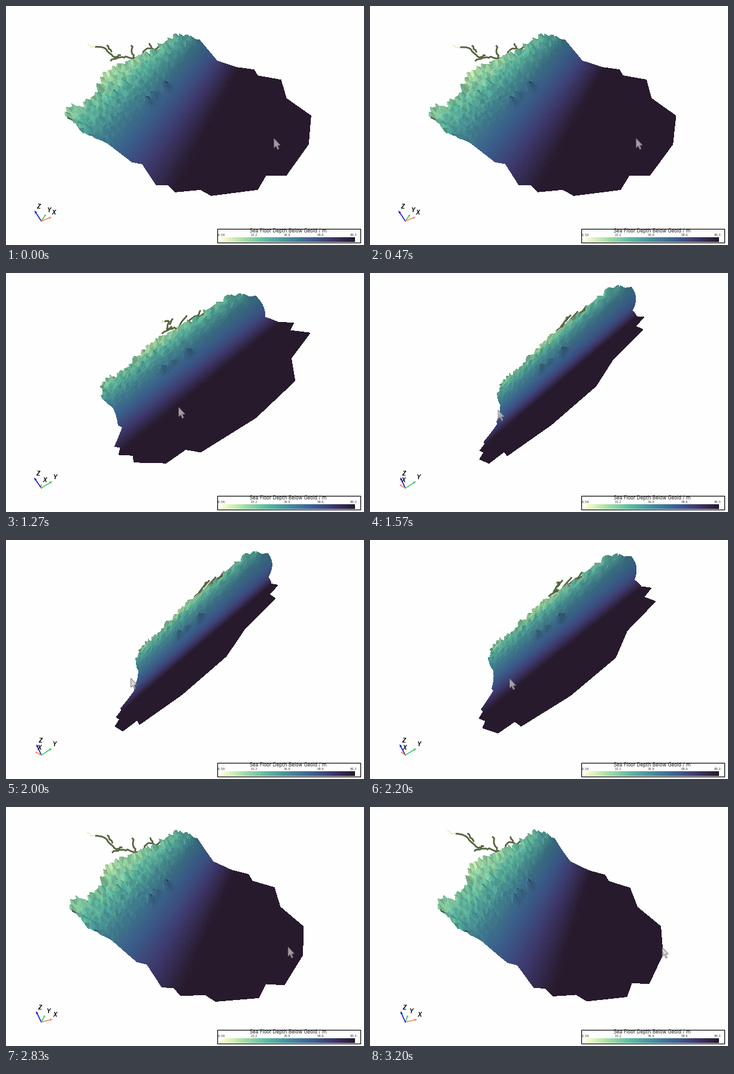
Animation, 598 px wide and 400 px high, one loop 3.23 s. Source, as a matplotlib script:

```python
import numpy as np
import matplotlib.pyplot as plt
from matplotlib.animation import FuncAnimation
from matplotlib.collections import LineCollection, PolyCollection
from matplotlib.colors import LinearSegmentedColormap
from matplotlib.patches import Polygon, Rectangle
from matplotlib.path import Path
from matplotlib.tri import Triangulation

W, H, LOOP, FRAMES = 598, 400, 3230, 95
STEP = LOOP // FRAMES
FOCAL = 746                       # 30 degree view angle, in pixels
PX = 0.72                         # points per pixel at 100 dpi
PAPER = "#fefefe"
rng = np.random.default_rng(4)

SEA = LinearSegmentedColormap.from_list("sea", [
    "#fdfecc", "#a5dea7", "#5eb9a3", "#488d9d", "#3e6394", "#3e396d",
    "#271a2c"])

# Key corners of the survey area in the opening view, the rest is roughened
COAST = np.array([
    (151, 222), (127, 208), (101, 186), (109, 170), (126, 172), (157, 145),
    (162, 118), (196, 99), (248, 77), (286, 50), (323, 57)], float)
OFFSHORE = np.array([
    (352, 92), (385, 103), (414, 107), (420, 117), (459, 124), (468, 155),
    (509, 184), (505, 231), (468, 283), (434, 283), (420, 307), (343, 317),
    (325, 307), (283, 311), (271, 299), (251, 299), (228, 264), (211, 261),
    (168, 228)], float)
SEAMOUNTS = [(268, 137, 15), (248, 151, 9), (239, 162, 12)]
RIVER = [((217, 94), (149, 69)), ((211, 87), (260, 64)), ((212, 86), (209, 65)),
         ((176, 77), (169, 65)), ((244, 71), (239, 62)), ((192, 82), (175, 92))]


def view_axes(azimuth, elevation, roll):
    """World X, Y, Z as rows of right, up, towards-viewer components."""
    a, e, r = np.radians([azimuth, elevation, roll])
    right = np.array([-np.sin(a), np.cos(a), 0])
    up = np.array([-np.sin(e) * np.cos(a), -np.sin(e) * np.sin(a), np.cos(e)])
    return np.column_stack([np.cos(r) * right - np.sin(r) * up,
                            np.sin(r) * right + np.cos(r) * up,
                            np.cross(right, up)])


AXES = view_axes(-55.5, 16.7, 33)


def shelf(p):
    """Signed distance from the shelf break and plane term of the depth."""
    x, y = p[:, 0] - W / 2, p[:, 1] - H / 2
    plane = 1.0165 - .000114 * x + .0015 * y
    return (.81 * (x - 46) + .585 * (y + 100)) / plane ** 2, plane


def lift(p):
    """Place opening-view pixels on the sea floor in camera space."""
    e, plane = shelf(p)
    near = 1 / (plane + .042 * (1 + np.tanh((-e - 62) / 55)))
    return np.column_stack([(p[:, 0] - W / 2) * near,
                            (H / 2 - p[:, 1]) * near, FOCAL * (1 - near)])


def project(q):
    s = FOCAL / (FOCAL - q[:, 2])
    return np.column_stack([W / 2 + q[:, 0] * s, H / 2 - q[:, 1] * s])


def densify(p, gap):
    out = []
    for a, b in zip(p[:-1], p[1:]):
        n = max(1, int(np.hypot(*(b - a)) / gap))
        out.append(a + (b - a) * np.arange(n)[:, None] / n)
    return np.vstack(out + [p[-1:]])


def lattice(gap):
    g = np.mgrid[95:515:gap, 45:320:gap].reshape(2, -1).T
    return g + rng.uniform(-.2, .2, g.shape) * gap


def build_floor():
    coast = densify(COAST, 3)
    coast[1:-1] += rng.normal(0, .9, (len(coast) - 2, 2))
    rest = densify(np.vstack([COAST[-1:], OFFSHORE, COAST[:1]]), 6)[1:-1]
    rim = np.vstack([coast, rest])
    shape = Path(rim)
    fine, wide = lattice(5), lattice(10)
    inner = np.vstack([fine[shelf(fine)[0] < 50], wide[shelf(wide)[0] >= 50]])
    inner = inner[shape.contains_points(inner)]
    gap = np.hypot(*(inner[:, None] - rim[None]).transpose(2, 0, 1)).min(1)
    pts = np.vstack([rim, inner[gap > 3]])

    tri = Triangulation(pts[:, 0], pts[:, 1]).triangles
    tri = tri[shape.contains_points(pts[tri].mean(1))]

    # Ridges run seaward, the shoreline itself is spiky
    e, _ = shelf(pts)
    along = .81 * pts[:, 1] - .585 * pts[:, 0]
    rough = np.clip((-e - 45) / 70, 0, 1)
    height = 1.8 * np.sin(.5 * along + 2 * np.sin(.05 * e))
    height += rng.normal(0, 1.3, len(pts))
    height[:len(coast)] += np.abs(rng.normal(1, 3.5, len(coast)))
    height *= rough
    for x, y, h in SEAMOUNTS:
        height += h * np.exp(-((pts - (x, y)) ** 2).sum(1) / 30)
    xyz = lift(pts) + height[:, None] * AXES[2]

    v = np.clip(.79 + .004 * e, .1, 1)
    v += .05 * rough * np.sin(pts[:, 0] * .21) * np.sin(pts[:, 1] * .17 + 1)

    a, b, c = xyz[tri].transpose(1, 0, 2)
    normal = np.cross(b - a, c - a)
    normal *= np.sign(normal[:, 2:])
    normal /= np.linalg.norm(normal, axis=1)[:, None]
    light = np.clip(.5 + .55 * normal @ [-.35, .5, .79], .5, 1.05)
    slope = np.clip((35 - e[tri].mean(1)) / 60, 0, 1)
    rgb = SEA(v[tri].mean(1))[:, :3] * (1 + slope * (light - 1))[:, None]
    return xyz, tri, np.clip(rgb, 0, 1)


def meander(a, b):
    """A winding creek between two points on the land."""
    p = densify(np.array([a, b], float), 3)
    u = np.linspace(0, 1, len(p))
    reach = np.subtract(b, a)
    side = np.array([-reach[1], reach[0]]) / np.hypot(*reach)
    sway = .06 * np.hypot(*reach) * np.sin(3 * np.pi * u)
    return lift(p + sway[:, None] * side + rng.normal(0, .7, p.shape))


def cursor_path(t):
    """Smooth pointer track through its main stops."""
    key = np.array([
        (0, 448, 222), (500, 443, 222), (870, 414, 224), (1270, 290, 225),
        (1640, 206, 230), (2000, 209, 231.5), (2140, 216, 232),
        (2430, 369, 234.5), (2830, 470, 234.5), (3230, 489, 235)])
    kt, kp = key[:, 0], key[:, 1:]
    m = np.gradient(kp, kt, axis=0)
    i = np.clip(np.searchsorted(kt, t, "right") - 1, 0, len(kt) - 2)
    h = (kt[i + 1] - kt[i])[:, None]
    u = (t - kt[i])[:, None] / h
    return ((1 + 2 * u) * (1 - u) ** 2 * kp[i] + u * (1 - u) ** 2 * h * m[i]
            + u * u * (3 - 2 * u) * kp[i + 1] + u * u * (u - 1) * h * m[i + 1])


def trackball(track):
    """Accumulate the drag into one rotation per frame."""
    rot, poses = np.eye(3), [np.eye(3)]
    for dx, dy in np.diff(track, axis=0):
        az, el = np.radians([-208 * dx / W, 200 * dy / H])
        ca, sa, ce, se = np.cos(az), np.sin(az), np.cos(el), np.sin(el)
        turn = np.array([[ca, 0, -sa], [0, 1, 0], [sa, 0, ca]])
        tilt = np.array([[1, 0, 0], [0, ce, -se], [0, se, ce]])
        rot = tilt @ turn @ rot
        poses.append(rot)
    return poses


xyz, tri, rgb = build_floor()
river = [meander(a, b) for a, b in RIVER]
creek = meander((150, 70), (136, 66))
track = cursor_path((np.arange(FRAMES) + .5) * STEP)
poses = trackball(track)

fig = plt.figure(figsize=(W / 100, H / 100), dpi=100, facecolor=PAPER)
ax = fig.add_axes([0, 0, 1, 1])
ax.axis("off")

creek_art = ax.plot([], [], color="#dfe0a0", lw=1 * PX, zorder=1)[0]
river_art = LineCollection([], colors="#55643f", linewidths=2.8 * PX, zorder=1)
floor_art = PolyCollection([], linewidths=.5 * PX, antialiased=False, zorder=2)
ax.add_collection(river_art)
ax.add_collection(floor_art)

# Scalar bar
ax.add_patch(Rectangle((353, 373), 239, 23, fc=PAPER, ec="black", lw=1.2 * PX,
                       zorder=5))
ax.imshow(np.linspace(0, 1, 256)[None], cmap=SEA, aspect="auto",
          extent=(360, 583, 395, 387), zorder=6)
ax.set(xlim=(0, W), ylim=(H, 0))
ax.text(471.5, 379, "Sea Floor Depth Below Geoid / m", ha="center",
        va="baseline", size=7.74 * PX, color="#222222", family="DejaVu Sans",
        zorder=7)
for i in range(5):
    ax.text(359.5 + 55.2 * i, 384.8, f"{-6.56 + 21.715 * i:.3g}", ha="center",
            va="baseline", size=5.2 * PX, color="#444444",
            family="DejaVu Sans", zorder=7)

# Orientation axes
ORIGIN = np.array([59, 360])
triad = []
for name, color in zip("XYZ", ["#ff8250", "#3cc86e", "#1414d2"]):
    stem = ax.plot([], [], color=color, lw=1.6 * PX, zorder=8)[0]
    head = ax.add_patch(Polygon([(0, 0)] * 3, fc=color, lw=0, zorder=8))
    text = ax.text(0, 0, name, ha="center", va="center", size=10 * PX,
                   family="Liberation Sans", weight="bold", style="italic",
                   zorder=10)
    triad.append((stem, head, text))

ARROW = np.array([(0, 0), (0, 15), (3.3, 12), (6, 18), (8, 17), (5.5, 11.3),
                  (10, 11)])
pointer = ax.add_patch(Polygon(ARROW, fc=(.8, .8, .8, .75), ec="#7c7a7c",
                               lw=1 * PX, zorder=12))


def draw_triad(rot):
    for (stem, head, text), axis in zip(triad, AXES @ rot.T):
        d = axis[:2] * (1, -1)
        tip, neck = ORIGIN + 22 * d, ORIGIN + 17 * d
        side = 2 * np.array([-d[1], d[0]]) / max(np.hypot(*d), .01)
        stem.set_data(*np.array([ORIGIN, neck]).T)
        head.set_xy([tip, neck + side, neck - side])
        for art in (stem, head):
            art.set_zorder(8 + .5 * axis[2])
        text.set_position(ORIGIN + 20 * d + (5.5, -7.5))


def update(i):
    rot = poses[i]
    q = xyz @ rot.T
    order = np.argsort(q[tri, 2].mean(1))
    floor_art.set_verts(project(q)[tri[order]])
    floor_art.set_facecolor(rgb[order])
    floor_art.set_edgecolor(rgb[order])
    river_art.set_segments([project(r @ rot.T) for r in river])
    creek_art.set_data(*project(creek @ rot.T).T)
    draw_triad(rot)
    pointer.set_xy(track[i] + ARROW)
    return []


anim = FuncAnimation(fig, update, frames=FRAMES, interval=STEP, repeat=True,
                     repeat_delay=0, blit=False)
plt.show()
```
